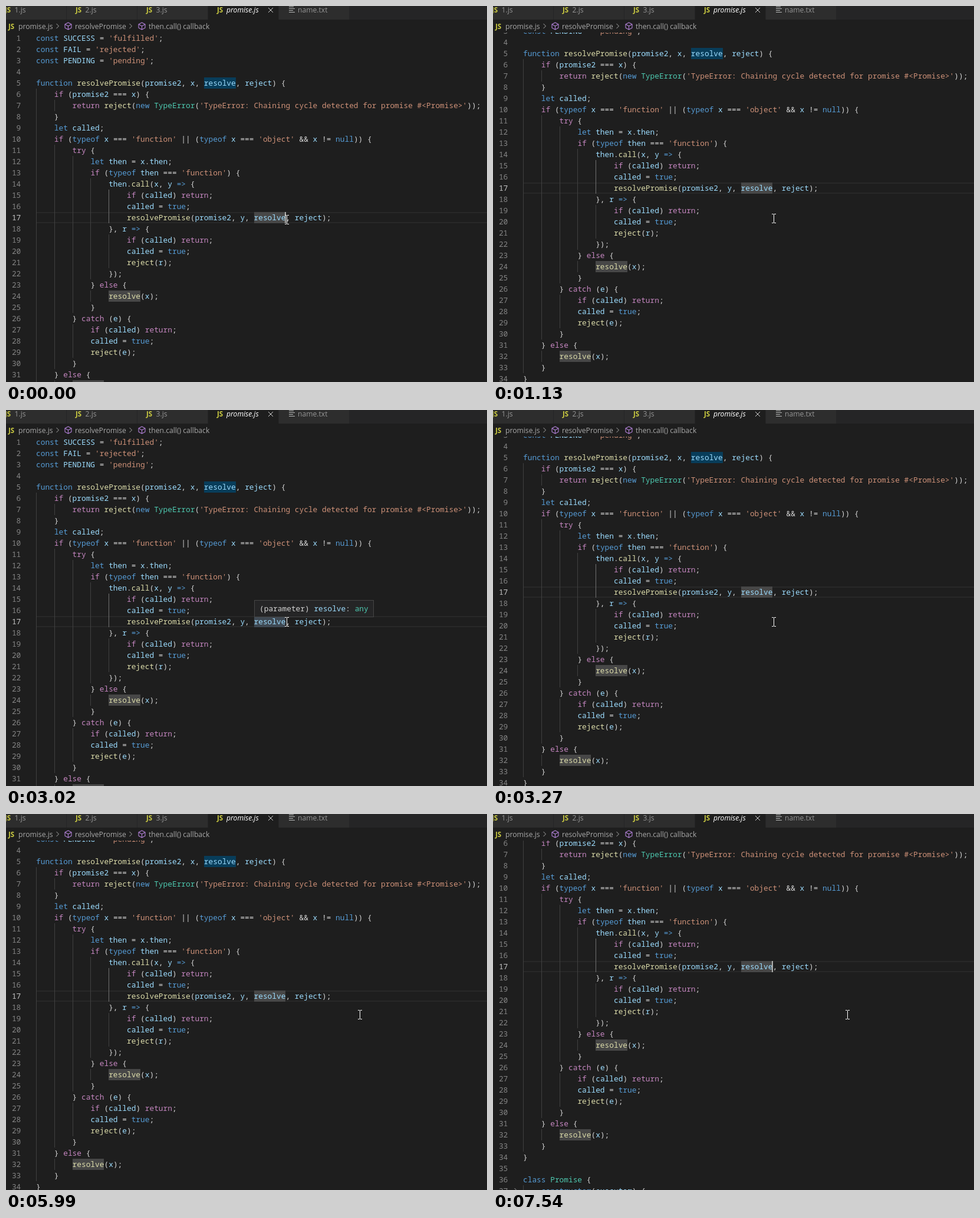
Animation, 816 px wide and 637 px high, one loop 8 s. Source, as an HTML page:

```html
<!DOCTYPE html>
<html lang="en">
<head>
<meta charset="utf-8">
<title>Editor</title>
<style>
  html, body { margin: 0; width: 100%; height: 100%; overflow: hidden; background: #1e1e1e; }
  svg { display: block; }
  .code { font: 12.83px "Noto Sans Mono", "DejaVu Sans Mono", monospace; fill: #d4d4d4; }
  .ui { font: 12.15px "Open Sans", "Noto Sans", sans-serif; fill: #a9a9a9; }
  .js { font-weight: 700; font-size: 11.5px; fill: #cbcb41; }
  .num { fill: #858585; text-anchor: end; }
  .control { fill: #c586c0; }
  .keyword { fill: #569cd6; }
  .type { fill: #4ec9b0; }
  .string { fill: #ce9178; }
  .func { fill: #dcdcaa; }
  .name { fill: #9cdcfe; }
  .line { fill: none; stroke: #a9a9a9; }
  .cube { fill: none; stroke: #b180d7; stroke-width: 1.1; stroke-linejoin: round; }
</style>
</head>
<body>
<svg width="816" height="637" viewBox="0 0 816 637">
  <g id="page" class="code"></g>
  <g id="tip" class="code">
    <rect x="421.5" y="322.5" width="202" height="28" fill="#252526" stroke="#454545"/>
    <text x="430" y="341">(parameter) <tspan class="name">resolve</tspan>: <tspan class="type">any</tspan></text>
  </g>
  <g id="header" class="ui"></g>
  <path id="mouse" fill="#fff" d="M0 0h3v1h-3zM4 0h3v1h-3zM3 1h1v14h-1zM0 15h3v1h-3zM4 15h3v1h-3z"/>
</svg>
<script>
const source = `const SUCCESS = 'fulfilled';
const FAIL = 'rejected';
const PENDING = 'pending';

function resolvePromise(promise2, x, resolve, reject) {
    if (promise2 === x) {
        return reject(new TypeError('TypeError: Chaining cycle detected for promise #<Promise>'));
    }
    let called;
    if (typeof x === 'function' || (typeof x === 'object' && x != null)) {
        try {
            let then = x.then;
            if (typeof then === 'function') {
                then.call(x, y => {
                    if (called) return;
                    called = true;
                    resolvePromise(promise2, y, resolve, reject);
                }, r => {
                    if (called) return;
                    called = true;
                    reject(r);
                });
            } else {
                resolve(x);
            }
        } catch (e) {
            if (called) return;
            called = true;
            reject(e);
        }
    } else {
        resolve(x);
    }
}

class Promise {
    constructor(executor) {`;

const LEFT = 51, TOP = 45, ROW = 19, CHAR = 7.698, CURRENT = 17;
const $ = id => document.getElementById(id);
const colX = col => LEFT + col * CHAR;
const rowY = line => TOP + (line - 1) * ROW;
const rect = (x, y, w, h, fill, extra = '') =>
  `<rect x="${x}" y="${y}" width="${w}" height="${h}" fill="${fill}" ${extra}/>`;
const text = (x, y, content, cls = '', extra = '') =>
  `<text x="${x}" y="${y}" class="${cls}" ${extra}>${content}</text>`;
const escapeHtml = s => s.replace(/&/g, '&amp;').replace(/</g, '&lt;').replace(/>/g, '&gt;');

const token = new RegExp([
  `(?<string>'[^']*')`,
  `(?<control>\\b(?:if|return|try|else|catch)\\b)`,
  `(?<keyword>\\b(?:const|function|let|new|typeof|null|true|class|constructor)\\b|=>)`,
  `(?<type>TypeError|(?<=class )\\w+)`,
  `(?<func>\\w+(?=\\())`,
  `(?<name>\\w+)`,
  `[^\\w'=]+|=`
].join('|'), 'g');

function highlight(code) {
  return [...code.matchAll(token)].map(m => {
    const kind = Object.keys(m.groups).find(k => m.groups[k]);
    const body = escapeHtml(m[0]);
    return kind ? `<tspan class="${kind}">${body}</tspan>` : body;
  }).join('');
}

function buildPage() {
  const y = rowY(CURRENT);
  const word = (line, col, fill, extra) =>
    rect(Math.round(colX(col)), rowY(line), col === 16 || col === 37 ? 54 : 53, ROW, fill, extra);
  let back = rect(LEFT, y, 765, 2, '#282828') + rect(LEFT, y + 17, 765, 2, '#282828');
  let front = '';
  source.split('\n').forEach((raw, i) => {
    const line = i + 1, code = raw.trim(), indent = raw.length - code.length;
    for (let col = 0; col < indent; col += 4) {
      const active = col === 16 && line <= CURRENT;
      back += rect(Math.round(colX(col)), rowY(line), 1, ROW, active ? '#707070' : '#404040');
    }
    const base = rowY(line) + 14;
    front += text(25.3, base, line, 'num', line === CURRENT ? 'style="fill:#c6c6c6"' : '');
    front += text(colX(indent), base, highlight(code));
  });
  back += word(5, 37, '#083d5a') + word(17, 48, '#474747') +
    word(24, 16, '#474747') + word(32, 8, '#474747') +
    word(17, 48, '#3f4953', 'id="hover"');
  front += '<path class="line" d="M36.5 734l4 4-4 4"/>';
  $('page').innerHTML = back + front + rect(473, y, 2, ROW, '#aeafad', 'id="caret"');
}

function buildHeader() {
  const cube = x => `<path class="cube" transform="translate(${x} 27.5)"
    d="M6.5.5L12 3.5V9.5L6.5 12.5L1 9.5V3.5ZM1 3.5L6.5 6.5L12 3.5M6.5 6.5V12.5"/>`;
  const chevron = x => `<path class="line" d="M${x} 30l4 4-4 4"/>`;
  let out = rect(0, 0, 816, 45, '#1e1e1e') + rect(0, 0, 816, 23, '#252526');
  for (let i = 0; i < 5; i++) {
    const x = i * 120 - 17;
    out += rect(x, 0, 119, 23, i === 3 ? '#1e1e1e' : '#2d2d2d');
    if (i < 4) out += text(x + 15, 10.5, 'JS', 'js');
    if (i < 3) out += text(x + 31.5, 11, `${i + 1}.js`, '', 'style="fill:#969696"');
  }
  out += text(374, 11, 'promise.js', '', 'style="fill:#fff;font-style:italic"');
  out += '<path class="line" style="stroke:#d0d0d0" d="M445 3l8 8M453 3l-8 8"/>';
  out += '<path class="line" style="stroke:#b8bab9" d="M480 1.5h8M480 4.5h10M480 7.5h7M480 10.5h10"/>';
  out += text(495, 11, 'name.txt', '', 'style="fill:#969696"');
  out += text(4, 38.5, 'JS', 'js') + text(21, 39, 'promise.js') + chevron(85.5) +
    cube(99) + text(117, 39, 'resolvePromise') + chevron(209.5) +
    cube(224) + text(242, 39, 'then.call() callback');
  $('header').innerHTML = out;
}

// Each track holds [start ms, value...] steps.
const scrollTrack = [[0, 0], [720, 50], [1550, 0], [3270, 50], [6150, 100]];
const tipTrack = [[0, 0], [570, 1], [720, 0], [1980, 0.5], [2100, 1], [3270, 0]];
const hoverTrack = [[0, 0], [570, 1], [720, 0], [1830, 1], [3270, 0]];
const mouseTrack = [[0, 473, 354], [140, 473, 353], [270, 473, 352], [1550, 473, 351],
  [5030, 566, 336], [5180, 597, 332], [6710, 598, 332]];
const blinks = [140, 570, 1130, 1550, 2100, 2630, 3020, 3550, 4080, 4600,
  5030, 5590, 5990, 6550, 7010, 7540];
const at = (track, t) => track.filter(step => step[0] <= t).pop().slice(1);

buildPage();
buildHeader();
const start = performance.now();

function draw() {
  const t = (performance.now() - start) % 8000;
  $('page').setAttribute('transform', `translate(0 ${-at(scrollTrack, t)[0]})`);
  $('mouse').setAttribute('transform', `translate(${at(mouseTrack, t).join(' ')})`);
  $('tip').setAttribute('opacity', at(tipTrack, t)[0]);
  $('hover').setAttribute('opacity', at(hoverTrack, t)[0]);
  $('caret').setAttribute('opacity', blinks.filter(b => b <= t).length % 2 ? 0 : 1);
  requestAnimationFrame(draw);
}
draw();
</script>
</body>
</html>
```
